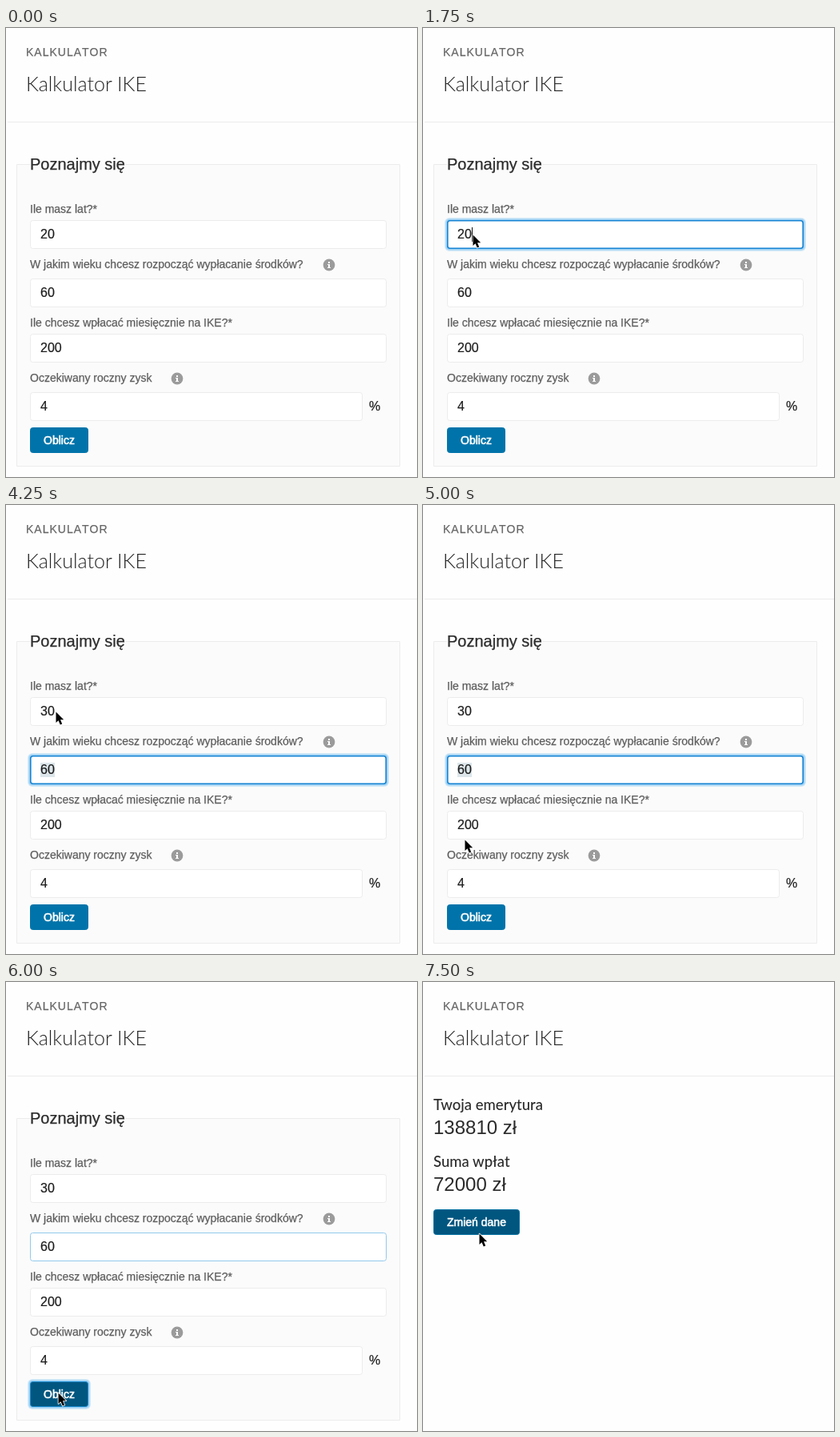
An HTML page for the animation above (8000 ms loop, 514 px wide and 561 px high).

```html
<!DOCTYPE html>
<html lang="pl">
<head>
<meta charset="utf-8">
<title>Kalkulator IKE</title>
<style>
html, body { margin: 0; width: 100%; height: 100%; overflow: hidden; background: #fefefe; }
svg { display: block; width: 514px; height: 561px; }
text { font: 14px "Liberation Sans", Arial, sans-serif; font-kerning: none; fill: #2b2b2b; white-space: pre; }
.crumb { fill: #666; stroke: #666; stroke-width: .25px; letter-spacing: 1px; }
.title { font: 300 25px Lato, sans-serif; font-kerning: auto; fill: #222; }
.legend { font-size: 20px; stroke: #2b2b2b; stroke-width: .25px; }
.label { fill: #5e5e5e; stroke: #5e5e5e; stroke-width: .25px; }
.value { font-size: 16px; fill: #1c1c1c; stroke: #1c1c1c; stroke-width: .2px; }
.option { font: bold 13px "DejaVu Sans", sans-serif; fill: #000; }
.heading { font: 500 18.5px Lato, sans-serif; font-kerning: auto; }
.amount { font-size: 24px; }
.action { fill: #fff; stroke: #fff; stroke-width: .55px; }
</style>
</head>
<body>
<svg id="stage" viewBox="0 0 514 561"></svg>
<script>
const LOOP = 8000;
const stage = document.getElementById('stage');

// [time, x, y] of the pointer tip
const pointerSteps = [
  [250, 366, 84], [500, 72, 256], [750, 69, 257], [1250, 61, 260], [1500, 62, 258],
  [4500, 48, 442], [4750, 41, 426], [5000, 52, 418], [5250, 40, 394], [5500, 50, 459],
  [5750, 62, 522], [6000, 65, 513], [6750, 67, 437], [7000, 68, 334], [7250, 70, 314]
];

const text = (kind, x, y, content) => `<text class="${kind}" x="${x}" y="${y}">${content}</text>`;

const box = (x, y, w, h, fill, border = 'none', radius = 3, line = 1) =>
  `<rect x="${x + line / 2}" y="${y + line / 2}" width="${w - line}" height="${h - line}" rx="${radius}"
    fill="${fill}" stroke="${border}" stroke-width="${line}"/>`;

const glow = (x, y, w, h) => [3, 2, 1].map(d =>
  `<rect x="${x - d}" y="${y - d}" width="${w + 2 * d}" height="${h + 2 * d}" rx="${3 + d}"
    fill="#2a9ae8" opacity=".18"/>`).join('');

function field(y, value, { state = '', width = 446, selected = false, caret = 0 } = {}) {
  const focused = state === 'focus';
  const border = { focus: '#1684d4', fading: '#92c9eb' }[state] || '#ececec';
  return (focused ? glow(30, y, width, 36) : '')
    + box(30, y, width, 36, '#fff', border, 3, focused ? 1.6 : 1)
    + (selected ? `<rect x="43" y="${y + 9}" width="18" height="18" fill="#dce6ea"/>` : '')
    + text('value', 43, y + 23, value)
    + (caret ? `<rect x="${caret}" y="${y + 9}" width="1" height="18" fill="#111"/>` : '');
}

const info = (x, y) => `<circle cx="${x}" cy="${y}" r="7.4" fill="#9b9b9b"/>
  <path d="M${x - 1} ${y - 4}h2v2h-2zM${x - 2} ${y - 1}h3v4h1v1h-4v-1h1v-3h-1z" fill="#fff"/>`;

const button = (x, y, width, label, hover, focused) =>
  (focused ? glow(x, y, width, 32) : '')
  + box(x, y, width, 32, hover ? '#00567f' : '#0074aa', focused ? '#1689cc' : hover ? '#006f9f' : '#0074aa')
  + text('action', x + 17, y + 21, label);

const header = text('crumb', 25, 35, 'KALKULATOR') + text('title', 25, 79, 'Kalkulator IKE')
  + '<path d="M2 117.5H514" stroke="#ececec"/>';

function form(t) {
  const first = {
    state: t >= 1750 && t < 3750 ? 'focus' : '',
    selected: t >= 2750 && t < 3000,
    caret: t >= 1750 && t < 2250 || t >= 3500 && t < 3750 ? 61 : t >= 3000 && t < 3500 ? 52 : 0
  };
  const second = {
    state: t >= 6000 ? 'fading' : t >= 4250 ? 'focus' : '',
    selected: t >= 4250 && t < 6000
  };
  const age = t < 3000 ? '20' : t < 3500 ? '3' : '30';
  const suggesting = t >= 3000 && t < 3750;

  return '<rect x="13" y="170" width="480" height="378" fill="#fbfbfb"/>'
    + '<path d="M30 170.5H13.5V547.5H492.5V170.5H149" fill="none" stroke="#ececec"/>'
    + text('legend', 30, 177, 'Poznajmy się')
    + text('label', 30, 231, 'Ile masz lat?*')
    + text('label', 30, 300, 'W jakim wieku chcesz rozpocząć wypłacanie środków?') + info(404, 296)
    + text('label', 30, 373, 'Ile chcesz wpłacać miesięcznie na IKE?*')
    + text('label', 30, 442, 'Oczekiwany roczny zysk') + info(214, 438)
    + field(240, age, first)
    + field(313, '60', second)
    + field(382, '200')
    + field(455, '4', { width: 416 }) + text('value', 454, 478, '%')
    + button(30, 499, 73, 'Oblicz', t >= 5750, t >= 6000)
    + (suggesting ? box(30, 277, 446, 26, '#fff', '#92c5e6', 0) + text('option', 39, 296, '30') : '');
}

const results = t => text('heading', 13, 160, 'Twoja emerytura')
  + text('amount', 13, 190, '138810 zł')
  + text('heading', 13, 231, 'Suma wpłat')
  + text('amount', 13, 261, '72000 zł')
  + button(13, 284, 108, 'Zmień dane', t >= 7250);

function pointer(t) {
  const step = pointerSteps.filter(([start]) => start <= t).pop();
  if (!step) return '';
  return `<path transform="translate(${step[1]} ${step[2]})" d="M.5 .5V14L3.5 11.2L5.8 16.6L8.2 15.6L6 10.3H10.2Z"
    fill="#000" stroke="#fff" stroke-linejoin="round" paint-order="stroke" stroke-width="1.6"/>`;
}

let shown = '';
function draw(now) {
  const t = now % LOOP;
  const picture = header + (t < 6250 ? form(t) : results(t)) + pointer(t);
  if (picture !== shown) stage.innerHTML = shown = picture;
}

const begin = performance.now();
function tick() {
  draw(performance.now() - begin);
  requestAnimationFrame(tick);
}
tick();
</script>
</body>
</html>
```
